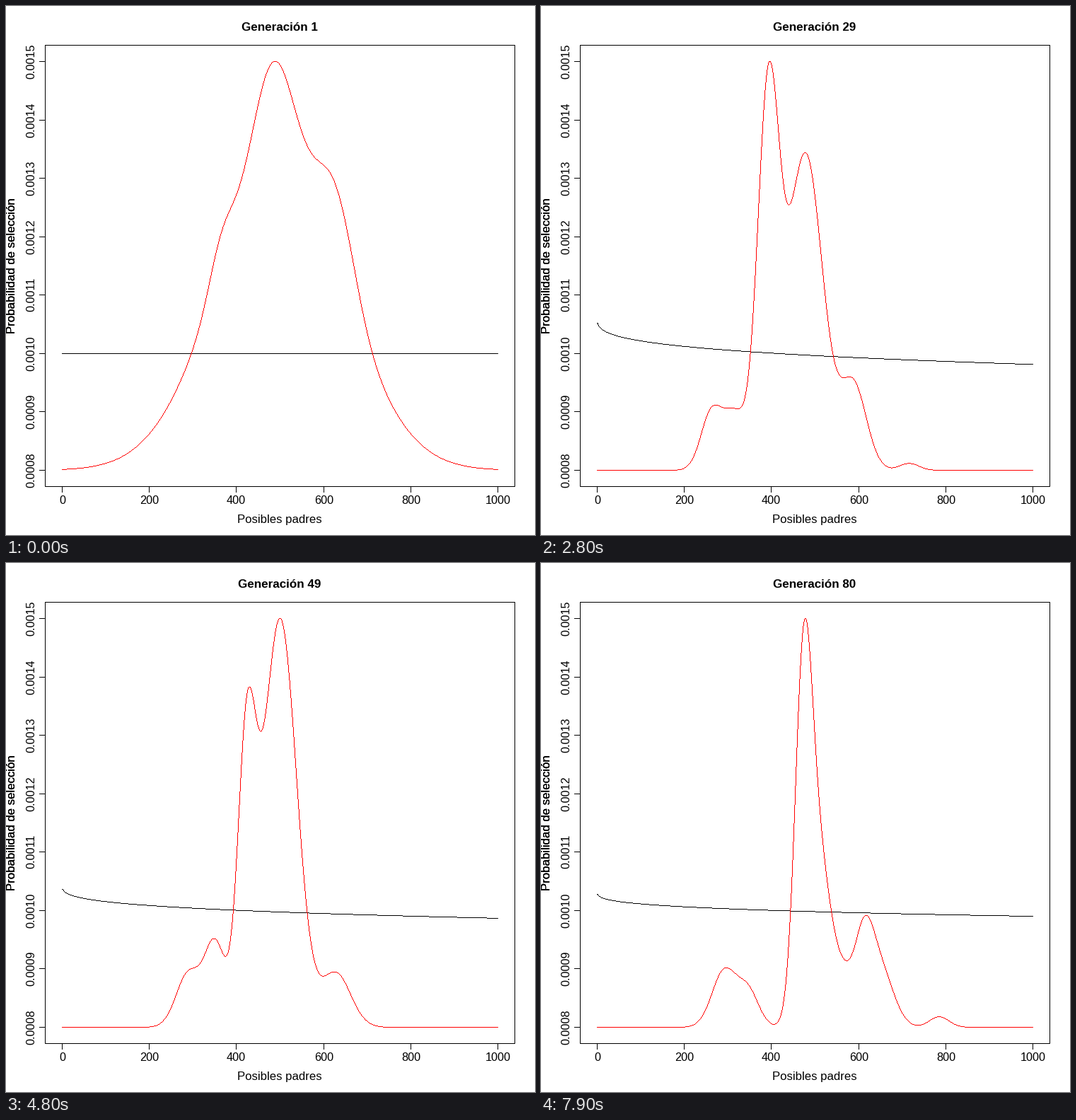
A matplotlib script that plays this animation: 748x748 px, repeating every 8 s.

```python
import numpy as np
import matplotlib.pyplot as plt
from matplotlib.animation import FuncAnimation

plt.rcParams["font.family"] = ["Liberation Sans", "DejaVu Sans"]
plt.rcParams["path.simplify"] = False

SIZE, DPI = 748, 64
PX = 72 / DPI
FRAMES = 80
LEFT, RIGHT, TOP, BASE, EVEN = 79, 695, 78, 656, 491
UNIT = (BASE - TOP) / 70  # pixels per 0.00001

cols = np.arange(LEFT, RIGHT + 1)
edges = np.arange(LEFT, RIGHT + 2) - 0.5
parents = np.clip((edges - LEFT) * 1000 / (RIGHT - LEFT), 1, 1000)


class Density:
    """Sum of bell curves, each given as (centre, height, width)."""

    def __init__(self, step, *bells):
        self.step, self.bells = step, bells
        self.peak = parents[self(parents).argmax()]

    def __call__(self, x):
        h = sum(a * np.exp(-((x - c) / w) ** 2 / 2) for c, a, w in self.bells)
        return h / h.max()


keys = [
    Density(0, (500, .75, 145), (365, .085, 28), (485, .25, 45),
            (630, .185, 42)),
    Density(16, (388, .18, 30), (474, .56, 21), (530, .85, 48),
            (640, .25, 42), (720, .08, 22), (800, .02, 28)),
    Density(28, (262, .14, 24), (315, .135, 26), (393, .93, 25),
            (478, .79, 40), (588, .21, 30), (716, .017, 22)),
    Density(36, (359, .185, 30), (469, .9, 23), (512, .42, 24),
            (583, .4, 29), (685, .05, 32)),
    Density(48, (290, .13, 28), (351, .2, 24), (424, .67, 21),
            (500, .99, 38), (628, .13, 34)),
    Density(59, (265, .11, 28), (315, .14, 38), (460, .64, 19),
            (500, .68, 35), (570, .17, 32), (664, .135, 32), (785, .022, 40)),
    Density(79, (292, .14, 28), (347, .085, 24), (474, .87, 20),
            (512, .38, 26), (565, .1, 22), (612, .2, 22), (650, .14, 30),
            (785, .026, 22)),
]


def density(n):
    """Blend two key curves with their main peaks kept together."""
    k = max(i for i, d in enumerate(keys[:-1]) if d.step <= n)
    a, b = keys[k:k + 2]
    u = (n - a.step) / (b.step - a.step)
    rng = np.random.default_rng(n)
    wobble = np.sin(np.pi * u)
    peak = (1 - u) * a.peak + u * b.peak + wobble * rng.uniform(-15, 15)
    x = parents - peak
    h = (1 - u) * a(x + a.peak) + u * b(x + b.peak)
    h *= 1 + 0.12 * wobble * rng.uniform(-1, 1) * np.sin(x / rng.uniform(40, 70))
    return BASE - (BASE - TOP) * h / h.max()


def chance(n):
    """Ranked chances: even at first, then a spread that dies down."""
    spread = 0.45 + 1.65 * np.exp(-(n + 1) / 27) if n else 0
    power = 0.3
    mean = 1000 ** power / (1 + power)
    return EVEN - UNIT * spread * (mean - parents ** power)


fig = plt.figure(figsize=(SIZE / DPI, SIZE / DPI), dpi=DPI, facecolor="white")
ax = fig.add_axes([0, 0, 1, 1])
ax.set(xlim=(0, SIZE), ylim=(SIZE, 0))
ax.axis("off")


def line(x, y, color="black", cap="projecting"):
    return ax.plot(np.add(x, 0.5), np.add(y, 0.5), color=color, lw=PX,
                   snap=False, solid_capstyle=cap, solid_joinstyle="miter")[0]


def trace(curve, y):
    """Draw a crisp one-pixel curve as one vertical run per column."""
    a, b = np.round(y[:-1]), np.round(y[1:])
    top = np.minimum(a, b)
    bottom = np.maximum(np.maximum(a, b), top + 1)
    gap = np.full(len(cols), np.nan)
    curve.set_data(np.repeat(cols + 0.5, 3),
                   np.column_stack([top, bottom, gap]).ravel())


def label(x, y, text, size=16.2, **kw):
    return ax.text(x, y, text, fontsize=size * PX, ha="center", va="baseline",
                   rotation_mode="anchor", **kw)


line([55, 719, 719, 55, 55, 719], [55, 55, 679, 679, 55, 55])
for i in range(6):
    x = round(LEFT + i * (RIGHT - LEFT) / 5)
    line([x, x], [679, 687])
    label(x + 0.5, 704, str(200 * i))
for i in range(8):
    y = round(BASE - i * (BASE - TOP) / 7)
    line([47, 55], [y, y])
    label(40, y, f"{0.0008 + i * 0.0001:.4f}", rotation=90)
label(387, 731, "Posibles padres", 16.7)
for _ in range(3):  # overprinting thickens the text
    label(13, 367, "Probabilidad de selección", 16.8, rotation=90)

title = label(387, 35, "", 17, weight="bold")
black = line([], [], cap="butt")
red = line([], [], "red", cap="butt")


def draw(n):
    title.set_text(f"Generación {n + 1}")
    trace(black, chance(n))
    trace(red, density(n))
    return title, black, red


anim = FuncAnimation(fig, draw, frames=FRAMES, interval=100, repeat=True,
                     repeat_delay=0)
plt.show()
```
